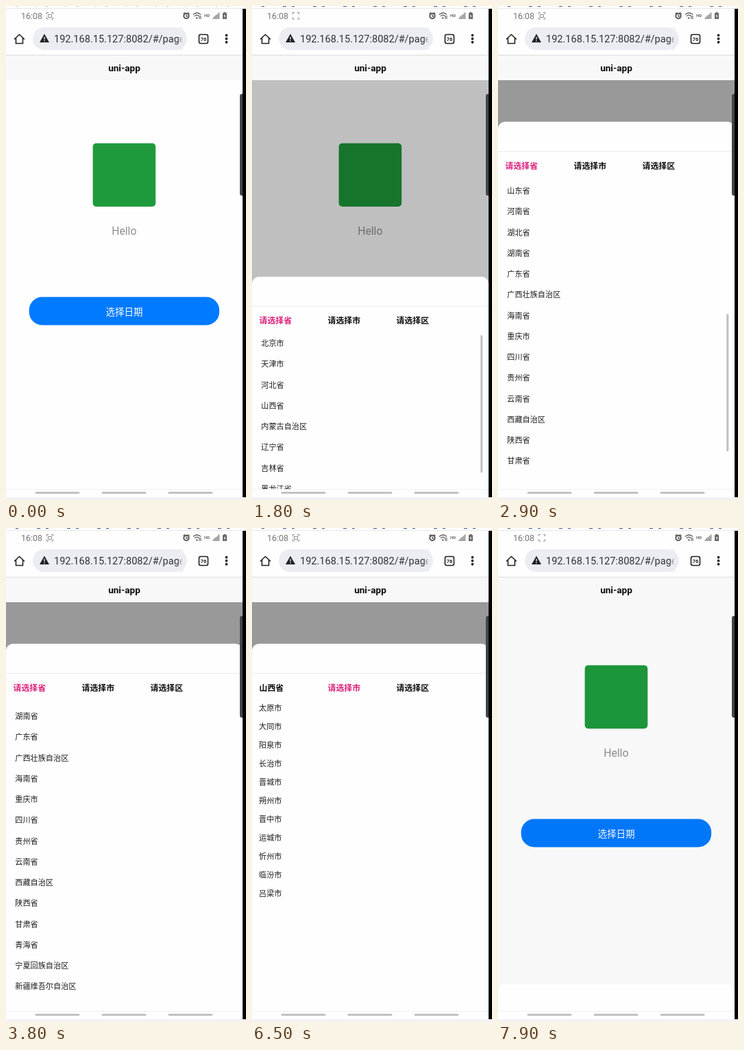
Recreate the animation shown at these times as an HTML page. Size 350 by 719 pixels, loop 8 s.

```html
<!DOCTYPE html>
<html lang="zh-CN">
<head>
<meta charset="utf-8">
<title>uni-app</title>
<style>
html, body { margin: 0; width: 100%; height: 100%; overflow: hidden; background: #fefefe; }
svg { display: block; }
text { font-family: Roboto, "Noto Sans CJK SC", "Noto Sans CJK", sans-serif; }
.cjk text { font-family: "Noto Sans CJK SC", "Noto Sans CJK", sans-serif; font-size: 11.15px; fill: #1c1c1c; }
.cjk #tabs text { font-size: 11.9px; font-weight: 700; }
</style>
</head>
<body>
<svg width="350" height="719" viewBox="0 0 350 719">
  <defs>
    <clipPath id="page"><rect y="108" width="345" height="595"/></clipPath>
    <clipPath id="listBox"><rect y="253" width="345" height="434"/></clipPath>
    <linearGradient id="fade">
      <stop offset="0" stop-color="#ecedf3" stop-opacity="0"/>
      <stop offset="1" stop-color="#ecedf3"/>
    </linearGradient>
  </defs>
  <rect width="350" height="719" fill="#fefefe"/>

  <!-- page -->
  <rect x="126.6" y="199.8" width="91.6" height="92.2" rx="5" fill="#1e9a3c"/>
  <text x="172.3" y="332.5" font-size="15.7" fill="#8f8f94" text-anchor="middle">Hello</text>
  <rect x="33.7" y="423.6" width="277.4" height="40.8" rx="19" fill="#007aff"/>
  <text x="172.4" y="449.8" font-size="13.5" fill="#fff" text-anchor="middle">选择日期</text>

  <!-- picker -->
  <g clip-path="url(#page)">
    <rect id="dim" y="108" width="345" height="595"/>
    <g id="sheet" class="cjk">
      <rect y="168.5" width="345" height="560" rx="10" fill="#fefefe"/>
      <path d="M0 211.5H345" stroke="#ececec"/>
      <g id="tabs"></g>
      <g clip-path="url(#listBox)"><g id="lists"></g></g>
      <rect id="thumb" x="333.3" width="3" height="200" rx="1" fill="#c0c0c0"/>
    </g>
  </g>

  <!-- status bar -->
  <path d="M0 3.5H345" stroke="#e8e8e8"/>
  <path id="edge" d="M14 .5H344"/>
  <text x="22" y="19" font-size="12.5" fill="#757575">16:08</text>
  <g fill="none" stroke="#8a8a8a">
    <path d="M59.5 12V9.5H62M66 9.5H68.5V12M68.5 16.5V19H66M62 19H59.5V16.5"/>
    <path id="cast" d="M61.5 12.5H66.5V16.5H61.5Z"/>
  </g>
  <g fill="none" stroke="#555" stroke-width="1.3">
    <circle cx="263" cy="14.5" r="3.7" stroke-width="2"/>
    <path d="M258.5 11.5L261 9.5M265 9.5L267.5 11.5M263 12.5V15H265"/>
    <path d="M273 12.5Q278.5 7.5 284 12.5M275 14.8Q278.5 11.5 281.5 14.8M277 16.8L278.5 18L279.5 16.8"/>
    <path d="M282 14V19M284 14V19" stroke-width="1"/>
    <path d="M302.5 19V16.5M304.5 19V14.5M306.5 19V13M308.5 19V11.5M310.5 19V9.5" stroke="#777"/>
  </g>
  <text x="289" y="16.3" font-size="6" font-weight="700" fill="#666">HD</text>
  <path d="M317.5 9H320.5V10.3H322V19H316V10.3H317.5Z" fill="#666"/>
  <path d="M319.5 11.5L317.5 15H319L318.5 18L320.5 14.3H319Z" fill="#fff"/>

  <!-- address bar -->
  <path d="M12 48.5L19.5 41.5L27 48.5M14.5 46.5V54.5H24.5V46.5" fill="none" stroke="#222" stroke-width="1.6"/>
  <rect x="39" y="31" width="225" height="33" rx="16.5" fill="#ecedf3"/>
  <path d="M56 40.5L63 53H49Z" fill="#202124"/>
  <path d="M56 45V48.7M56 50V51.4" stroke="#ecedf3" stroke-width="1.4"/>
  <svg x="70" y="31" width="188" height="33">
    <text y="21.8" font-size="14.55" fill="#303135">192.168.15.127:8082/#/page</text>
    <rect x="180" width="8" height="33" fill="url(#fade)"/>
  </svg>
  <rect x="281.5" y="41.5" width="13" height="13" rx="2.5" fill="none" stroke="#222" stroke-width="1.6"/>
  <text x="288" y="50.8" font-size="7.5" font-weight="700" fill="#222" text-anchor="middle">76</text>
  <path d="M321.5 42.7V53" stroke="#222" stroke-width="3.8" stroke-linecap="round" stroke-dasharray="0 5"/>
  <path d="M0 71.5H345" stroke="#dcdcdc"/>
  <rect y="72" width="345" height="36" fill="#f8f8f8"/>
  <text x="172.5" y="95" font-size="13.6" font-weight="700" fill="#0a0a0a" text-anchor="middle">uni-app</text>

  <!-- screen edges -->
  <path d="M0 703.5H345" stroke="#f0f0f0"/>
  <path d="M44 708.5H106M141 708.5H203M238 708.5H300" stroke="#c2c2c2" stroke-width="3" stroke-linecap="round"/>
  <path d="M345 128H344Q341 128 341 131V273Q341 276 344 276H345Z" fill="#444"/>
  <rect y="715" width="350" height="4" fill="#f2f2f2"/>
  <rect x="345" y="4" width="5" height="711"/>
</svg>
<script>
const $ = id => document.getElementById(id);
const clamp = v => Math.min(1, Math.max(0, v));
const easeOut = u => 1 - (1 - clamp(u)) ** 3;
const openness = t => easeOut((t - 1725) / 300) - easeOut((t - 7725) / 300);

function add(parent, tag, attrs, content = '') {
  const el = document.createElementNS('http://www.w3.org/2000/svg', tag);
  for (const k in attrs) el.setAttribute(k, attrs[k]);
  el.textContent = content;
  return parent.appendChild(el);
}

function makeList(names, x, y, gap) {
  const g = add($('lists'), 'g', {});
  names.split(' ').forEach((name, i) => add(g, 'text', { x, y: y + i * gap }, name));
  return g;
}

const lists = [
  makeList('北京市 天津市 河北省 山西省 内蒙古自治区 辽宁省 吉林省 黑龙江省 上海市 江苏省 浙江省 安徽省 福建省 江西省 山东省 河南省 湖北省 湖南省 广东省 广西壮族自治区 海南省 重庆市 四川省 贵州省 云南省 西藏自治区 陕西省 甘肃省 青海省 宁夏回族自治区 新疆维吾尔自治区', 13.3, 269.6, 30.25),
  makeList('太原市 大同市 阳泉市 长治市 晋城市 朔州市 晋中市 运城市 忻州市 临汾市 吕梁市', 10, 266.2, 26.95),
  makeList('城区 沁水县 阳城县 陵川县 泽州县 高平市 其它区', 10, 266.2, 26.95)
];
const prompts = ['请选择省', '请选择市', '请选择区'];
const choices = ['山西省', '晋城市', '高平市'];
const pickTimes = [6300, 7000, 7700];
const tabs = prompts.map((_, i) => add($('tabs'), 'text', { x: 10.5 + i * 100, y: 236.9 }));

// [time, scroll offset]
const scrolls = [[0, 0], [2400, 384.7], [2500, 505.7], [2700, 306], [2800, 220],
  [2900, 420], [3000, 505.7], [5500, 407], [5600, 0]];
const blinks = [1500, 1900, 2400, 2800, 3300, 3800, 4200, 4700, 5100, 5600, 6000, 6500, 7000, 7500, 7900];

function draw(t) {
  // the backdrop runs slightly ahead of the sheet
  $('dim').setAttribute('opacity', 0.4 * openness(t + 8));
  $('sheet').setAttribute('transform', `translate(0 ${534.5 * (1 - openness(t))})`);

  const picked = pickTimes.filter(p => t >= p).length;
  const active = Math.min(picked, 2);
  tabs.forEach((tab, i) => {
    tab.textContent = (i < picked ? choices : prompts)[i];
    tab.style.fill = i === active ? '#dc1f7c' : '#0c0c0c';
  });
  lists.forEach((g, i) => g.style.display = i === active ? '' : 'none');

  const scroll = scrolls.findLast(s => t >= s[0])[1];
  lists[0].setAttribute('transform', `translate(0 ${-scroll})`);
  $('thumb').setAttribute('y', 253.7 + scroll * 0.463);
  $('thumb').setAttribute('opacity', clamp(t < 5500 ? 1 - (t - 3200) / 300 : 1 - (t - 5900) / 200));

  const blinkCount = blinks.filter(b => t >= b).length;
  $('cast').style.display = blinkCount % 2 ? 'none' : '';
  const late = t >= 1100;
  $('edge').setAttribute('stroke', late ? '#3b5a94' : '#c9c9c9');
  $('edge').setAttribute('stroke-dasharray', late ? '4 27 5 8' : '3 25 2 14');
}

const start = performance.now();
function tick() {
  // the screen advances in 100 ms steps
  draw(Math.floor((performance.now() - start) % 8000 / 100) * 100);
  requestAnimationFrame(tick);
}
tick();
</script>
</body>
</html>
```
